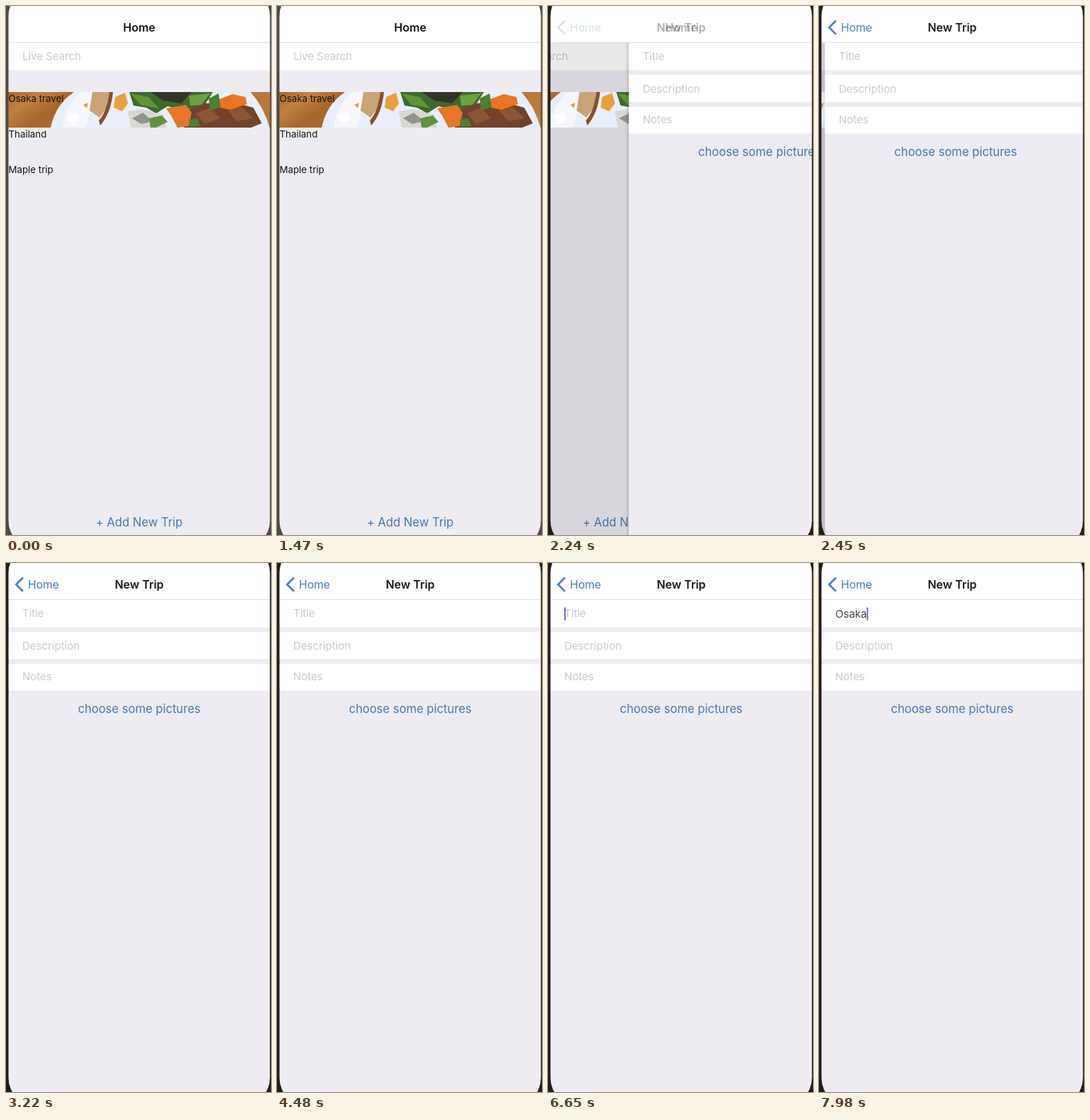
Write an HTML page that moves like this. It is 374 px wide and 744 px high and loops after 8 s.

```html
<!DOCTYPE html>
<html lang="en">
<head>
<meta charset="utf-8">
<title>Trip planner</title>
<style>
  @property --push { syntax: "<number>"; inherits: true; initial-value: 0; }

  html, body { margin: 0; width: 100%; height: 100%; overflow: hidden; }
  svg {
    display: block; width: 374px; height: 744px;
    font-family: Inter, "Open Sans", sans-serif;
    animation: push 8s infinite;
  }

  /* --push runs from 0 (list screen) to 1 (form screen) */
  @keyframes push {
    0% { --push: 0; }
    26.54% { --push: 0; animation-timing-function: cubic-bezier(.2833, .99, .31833, .99); }
    32.79%, 100% { --push: 1; }
  }
  @keyframes bezel {
    0% { fill: #4c4a4b; }
    24.5%, 100% { fill: #1f1e20; }
  }
  @keyframes tap {
    0%, 25.2% { opacity: 1; }
    26.2% { opacity: .4; }
    29%, 100% { opacity: 1; }
  }

  .bezel { animation: bezel 8s step-end infinite; }
  .list { transform: translateX(calc(var(--push) * -110.7px)); }
  .form { transform: translateX(calc((1 - var(--push)) * 370px)); }
  .dim { opacity: calc(var(--push) * .13); }
  .shadow { opacity: calc(var(--push) * 2); }
  .add { animation: tap 8s infinite; }

  .title { font-size: 16px; font-weight: 600; fill: #161616; text-anchor: middle; }
  .title.old { opacity: calc(1 - var(--push)); }
  .title.new { opacity: calc(var(--push) * 2.2 - 1.2); }
  .back { font-size: 15.7px; fill: #447bc0; opacity: calc(var(--push) * 2.6 - 1.6); }

  .paper { fill: #eeebf2; }
  .row { fill: #fff; }
  .hint { font-size: 15px; fill: #c9c8d0; }
  .typed { font-size: 15px; fill: #444347; }
  .trip { font-size: 13.3px; fill: #151416; }
  .link { font-size: 16.6px; fill: #447ab4; text-anchor: middle; }
</style>
</head>
<body>
<svg viewBox="0 0 374 744">
  <defs>
    <clipPath id="photo"><rect x="3" y="121" width="370" height="50"/></clipPath>
    <linearGradient id="wood" x2="1" y2=".2">
      <stop stop-color="#a96628"/><stop offset=".12" stop-color="#c08144"/>
      <stop offset=".25" stop-color="#a8662c"/><stop offset="1" stop-color="#b97a3f"/>
    </linearGradient>
    <linearGradient id="edge">
      <stop stop-opacity="0"/><stop offset="1" stop-opacity=".12"/>
    </linearGradient>
  </defs>

  <g class="list">
    <rect class="paper" x="3" width="370" height="744"/>
    <rect class="row" x="3" y="52" width="370" height="38.5"/>
    <text class="hint" x="23" y="76.3">Live Search</text>
    <text class="trip" x="3.5" y="184.5">Thailand</text>
    <text class="trip" x="3.5" y="234.5">Maple trip</text>
    <text class="link add" x="188" y="732">+ Add New Trip</text>
    <rect class="dim" x="3" y="52" width="370" height="692"/>

    <g clip-path="url(#photo)">
      <rect x="3" y="121" width="370" height="50" fill="url(#wood)"/>
      <path d="M63 171Q70 138 96 121H345Q364 142 372 171Z" fill="#e9eef8"/>
      <path d="M80 171Q84 138 106 121H128L112 171Z" fill="#f5f7fd"/>
      <ellipse cx="95" cy="157" rx="8" ry="7" fill="#fff"/>
      <path d="M122 121H148L142 143L132 157L118 147Z" fill="#c9a477"/>
      <path d="M131 161Q142 150 146 121L151 121Q148 151 133 168Z" fill="#87502d"/>
      <path d="M154 128L168 122L172 137L164 148L152 143Z" fill="#e7a13e"/>
      <path d="M109 139L116 136L114 144Z" fill="#e7a13e"/>
      <path d="M174 121H292L280 140L250 147L228 141L212 151L198 143L180 140Z" fill="#3d6a2d"/>
      <path d="M176 123L201 128L216 144L190 139Z" fill="#62953b"/>
      <path d="M204 121H262L247 137L222 133Z" fill="#34332a"/>
      <path d="M258 126L288 123L276 139L260 140Z" fill="#6fa044"/>
      <path d="M172 148L192 145L222 153L226 171H176Z" fill="#d8d8d2"/>
      <path d="M178 158L193 150L207 162L191 166Z" fill="#8f9491"/>
      <path d="M202 158L220 154L228 163L212 171H204Z" fill="#629142"/>
      <path d="M256 146L281 137L317 134L349 143L361 165L346 171H251Z" fill="#72422c"/>
      <path d="M268 151L288 143L302 158L281 166ZM313 147L333 142L349 158L326 162Z" fill="#8a5636"/>
      <path d="M226 144L254 139L262 150L258 169L242 171L233 154Z" fill="#e3772a"/>
      <path d="M301 131L320 124L338 128L340 138L317 146L302 143Z" fill="#ea7424"/>
      <path d="M286 130L300 123L303 142L288 147ZM258 160L270 158L274 169L260 170Z" fill="#4e7f34"/>
    </g>
    <text class="trip" x="3.5" y="134.5">Osaka travel</text>
  </g>

  <g class="form">
    <rect class="shadow" x="-2" y="52" width="5.5" height="692" fill="url(#edge)"/>
    <rect class="paper" x="3.5" y="52" width="370" height="692"/>
    <rect class="row" x="3.5" y="52" width="370" height="38.5"/>
    <rect class="row" x="3.5" y="97" width="370" height="38"/>
    <rect class="row" x="3.5" y="142" width="370" height="37.5"/>
    <text class="hint" id="titleHint" x="23" y="76.3">Title</text>
    <text class="typed" id="typed" x="23" y="77"></text>
    <rect id="caret" x="23" y="62.5" width="1.8" height="18" fill="#5360bd"/>
    <text class="hint" x="23" y="121.8">Description</text>
    <text class="hint" x="23" y="165.3">Notes</text>
    <text class="link" x="188" y="210.5">choose some pictures</text>
  </g>

  <rect class="row" width="374" height="51.5"/>
  <rect y="51" width="374" height="1" fill="#dfdee3"/>
  <text class="title old" x="188" y="36">Home</text>
  <text class="title new" x="188" y="36">New Trip</text>
  <g class="back">
    <path d="M24 20.5L14.3 30.2L24 39.9" fill="none" stroke="#447bd0" stroke-width="2.7"/>
    <text x="31" y="36">Home</text>
  </g>

  <!-- device frame with a rounded opening -->
  <path class="bezel" fill-rule="evenodd" d="M-9 -40H390V790H-9Z
    M43.5 -26H332.5a40 40 0 0 1 40 40V724a40 40 0 0 1 -40 40H43.5a40 40 0 0 1 -40 -40V14a40 40 0 0 1 40 -40Z"/>
</svg>
<script>
  const LOOP = 8000, FOCUS = 6440;
  const WORD = "Osaka", KEY_TIMES = [7000, 7210, 7420, 7560, 7700];
  const byId = id => document.getElementById(id);
  const typed = byId("typed"), caret = byId("caret"), titleHint = byId("titleHint");
  const clock = document.querySelector("svg").getAnimations()[0];

  function render() {
    const time = (clock ? clock.currentTime : performance.now()) % LOOP;
    const count = KEY_TIMES.filter(key => time >= key).length;
    typed.textContent = WORD.slice(0, count);
    titleHint.style.visibility = count ? "hidden" : "visible";
    caret.style.visibility = time >= FOCUS ? "visible" : "hidden";
    caret.setAttribute("x", 23 + (count ? typed.getComputedTextLength() : 0));
    requestAnimationFrame(render);
  }
  render();
</script>
</body>
</html>
```
